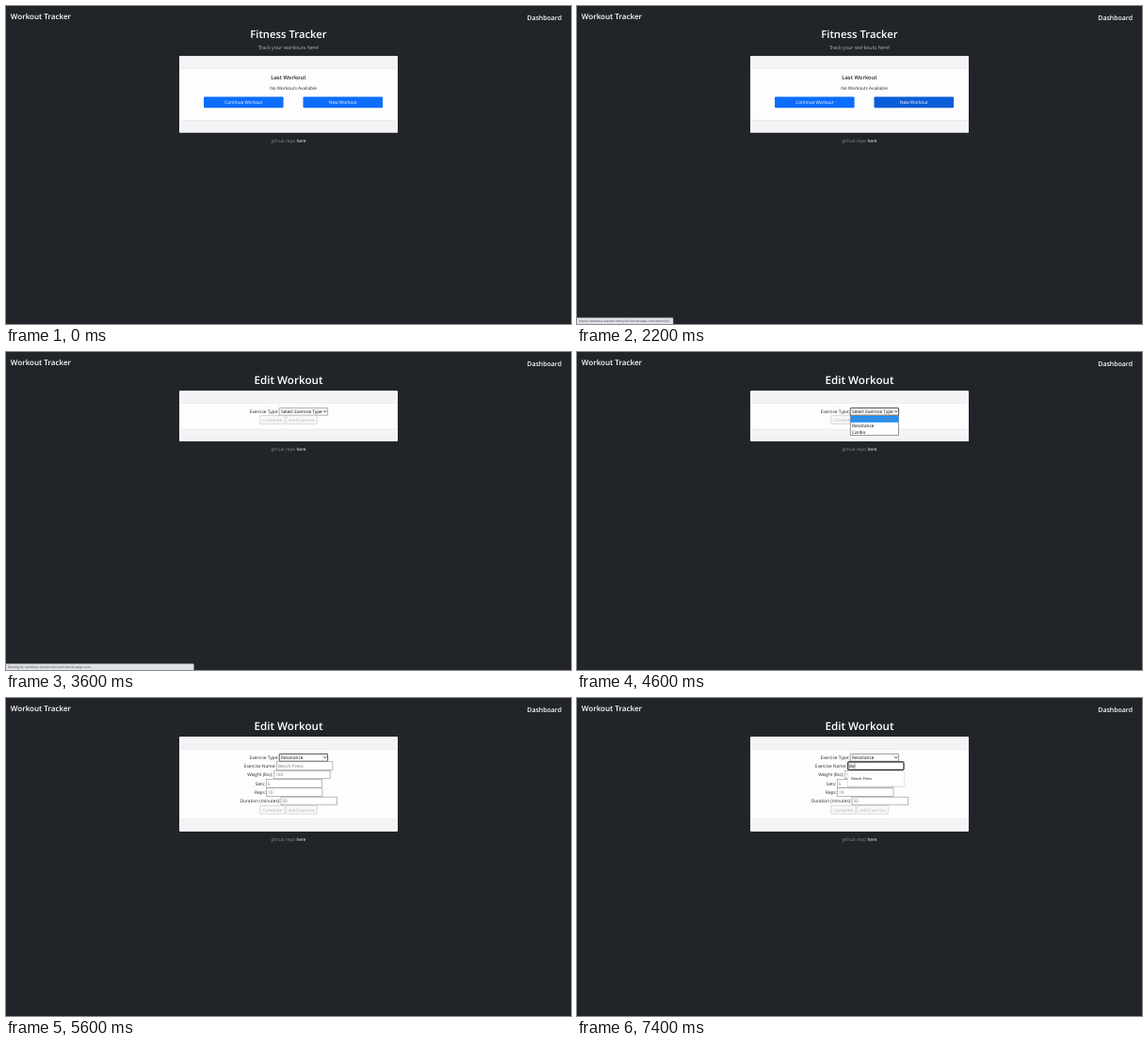
Write an HTML page that moves like this. It is 600 px wide and 338 px high and loops after 8000 ms.

```html
<!DOCTYPE html>
<html lang="en">
<head>
<meta charset="utf-8">
<title>Fitness Tracker</title>
<style>
  html, body { margin: 0; width: 100%; height: 100%; overflow: hidden; background: #212529; }
  svg { display: block; width: 100vw; height: 100vh; }
  text { font-family: "Open Sans", "Noto Sans", sans-serif; text-rendering: geometricPrecision; white-space: pre; }
</style>
</head>
<body>
<svg id="stage" viewBox="0 0 600 338" preserveAspectRatio="none"></svg>
<script>
const LOOP = 8000;
const BODY = 4.74;
const INK = '#212529';
const BLUE = { normal: '#0d6efd', hover: '#0b5ed7', active: '#0a58ca' };
const HOST = 'workout-tracker-dorryvel.herokuapp.com';
const SAVED_NAMES = ['Derry Vool', 'kbd orlane', 'Derry Callowick Vool', 'dbfoj', 'callowickvoon', 'vxcds'];

// Moments at which the picture changes, in ms
const AT = {
  hoverContinue: 1600, leaveContinue: 1800, hoverNew: 2000, linkStatus: 2200,
  press: 3000, waiting: 3200, editPage: 3600, loaded: 4000, hoverSelect: 4200,
  openSelect: 4600, pickResistance: 5200, fullForm: 5600, focusName: 6000,
  suggest: 6200, caretOff: 6600, caretOn: 7200, typed: 7400
};

const stage = document.getElementById('stage');

const rect = (x, y, w, h, fill, extra = '') =>
  `<rect x="${x}" y="${y}" width="${w}" height="${h}" fill="${fill}" ${extra}/>`;

const stroke = (color, width, radius = 0) => `stroke="${color}" stroke-width="${width}" rx="${radius}"`;

const text = (x, y, content, { size = BODY, fill = INK, weight = 400, anchor = 'start' } = {}) =>
  `<text x="${x}" y="${y}" font-size="${size}" fill="${fill}" font-weight="${weight}" text-anchor="${anchor}">${content}</text>`;

const centered = (x, y, content, style = {}) => text(x, y, content, { ...style, anchor: 'middle' });

function navbar() {
  const style = { fill: '#fff', weight: 600 };
  return text(4.8, 13.5, 'Workout Tracker', { ...style, size: 8.05 }) +
    text(590, 15.4, 'Dashboard', { ...style, size: 6.95, anchor: 'end' });
}

function card(top, bottom) {
  const height = bottom - top;
  const band = 13;
  const line = y => rect(184, y, 232, 0.4, '#d9d9dc');
  return rect(184, top, 232, height, '#fdfdfe', 'rx="1.2"') +
    rect(184, top, 232, band, '#f4f3f5', 'rx="1.2"') +
    rect(184, bottom - band, 232, band, '#f4f3f5', 'rx="1.2"') +
    line(top + band - 0.2) + line(bottom - band - 0.2);
}

function repoLink(y) {
  return centered(300, y, 'github repo <tspan fill="#fff" font-weight="500">here</tspan>', { fill: '#868a8e' });
}

function blueButton(x, label, state, focused) {
  const ring = focused ? rect(x - 1, 95.4, 86.6, 13.9, '#9dbcf0', 'rx="1.8"') : '';
  return ring + rect(x, 96.4, 84.6, 11.9, BLUE[state], 'rx="1.2"') +
    centered(x + 42.3, 104.1, label, { fill: '#fff' });
}

function homePage(t) {
  const continueState = t >= AT.hoverContinue && t < AT.leaveContinue ? 'hover' : 'normal';
  const newState = t >= AT.press ? 'active' : t >= AT.hoverNew ? 'hover' : 'normal';
  return centered(300, 33.6, 'Fitness Tracker', { size: 11.3, fill: '#fff', weight: 600 }) +
    centered(300, 46, 'Track your workouts here!', { size: 5.6, fill: '#fff', weight: 300 }) +
    card(53.3, 134.6) +
    centered(300, 77.6, 'Last Workout', { size: 5.82, weight: 600 }) +
    centered(305, 89.4, 'No Workouts Available') +
    blueButton(210, 'Continue Workout', continueState, false) +
    blueButton(315.5, 'New Workout', newState, t >= AT.waiting) +
    repoLink(145.2);
}

function select(t, label) {
  const focused = t >= AT.openSelect && t < AT.focusName;
  const border = focused ? stroke('#111', 0.7, 0.5) : stroke(t >= AT.hoverSelect ? '#444' : '#606060', 0.5, 0.3);
  return text(258.6, 65.2, 'Exercise Type:') +
    rect(290.2, 59.5, 51.4, 7.7, '#fff', border) +
    text(292, 65.2, label, { fill: '#000' }) +
    `<path d="M337.4 62.4l1.4 1.5 1.4-1.5" fill="none" stroke="#000" stroke-width=".8"/>`;
}

function field(y, labelX, label, inputX, placeholder) {
  return text(labelX, y + 1.7, label) +
    rect(inputX, y - 4.3, 59.3, 8.6, '#fff', stroke('#767676', 0.5)) +
    text(inputX + 1.3, y + 1.7, placeholder, { fill: '#757575' });
}

function formButtons(y) {
  const button = (x, w, label) =>
    rect(x, y - 4.4, w, 8.8, '#fafafa', stroke('#b4b4b4', 0.5, 0.3)) +
    centered(x + w / 2, y + 1.7, label, { fill: '#b2b2b2' });
  return button(269.7, 26.2, 'Complete') + button(297.7, 32.6, 'Add Exercise');
}

function options(t) {
  const picked = t >= AT.pickResistance ? 1 : 0;
  const labels = ['Select Exercise Type', 'Resistance', 'Cardio'];
  const rowHeight = 6.8;
  return rect(290.2, 67.6, 51.5, 21, '#fff', stroke('#555', 0.6)) +
    labels.map((label, i) => {
      const y = 68 + i * rowHeight;
      const fill = i === 0 ? '#808080' : i === picked ? '#fff' : '#000';
      return (i === picked ? rect(290.5, y, 50.9, rowHeight, '#1e90ff') : '') +
        text(292, y + 5.1, label, { fill });
    }).join('');
}

function suggestions(names) {
  const height = names.length === 1 ? 16.3 : 72;
  return rect(286.8, 77.6, 61.4, height + 0.8, '#000', 'opacity=".12" rx="1"') +
    rect(287.3, 77.5, 60.3, height, '#fff', stroke('#d4d4d6', 0.3, 0.8)) +
    names.map((name, i) => text(291.2, 86.9 + i * 11.22, name, { size: 3.85, fill: '#111' })).join('');
}

function nameInput(t) {
  const typed = t >= AT.typed;
  const caret = t < AT.caretOff || t >= AT.caretOn;
  return rect(287.8, 68, 59.2, 8.3, '#fff', stroke('#000', 1, 0.8)) +
    text(289, 73.8, typed ? 'Be' : 'Bench Press', { fill: typed ? '#000' : '#757575' }) +
    (caret ? rect(typed ? 294.8 : 288.8, 69.4, 0.4, 5.6, '#000') : '');
}

function editPage(t) {
  const heading = centered(300, 33.6, 'Edit Workout', { size: 11.65, fill: '#fff', weight: 600 });
  if (t < AT.fullForm) {
    return heading + card(41.3, 95) + select(t, 'Select Exercise Type') + formButtons(72) +
      repoLink(105.4) + (t >= AT.openSelect ? options(t) : '');
  }
  return heading + card(41.3, 141.7) + select(t, 'Resistance') +
    field(72.1, 252.8, 'Exercise Name:', 287.6, 'Bench Press') +
    field(81.5, 256.2, 'Weight (lbs):', 284.8, '100') +
    field(90.8, 264.8, 'Sets:', 276.3, '5') +
    field(100.1, 264, 'Reps:', 276.7, '10') +
    field(109.5, 248.7, 'Duration (minutes):', 292, '30') +
    formButtons(118.8) + repoLink(152.4) +
    (t >= AT.focusName ? nameInput(t) : '') +
    (t >= AT.suggest ? suggestions(t >= AT.typed ? ['Bench Press'] : SAVED_NAMES) : '');
}

function statusBar(t) {
  if (t < AT.linkStatus || t >= AT.loaded) return '';
  const waiting = t >= AT.waiting;
  const width = waiting ? 199.3 : 102;
  const label = waiting ? `Waiting for ${HOST}...` : `https://${HOST}/exercise?`;
  return rect(-1, 331.4, width + 1, 8, '#dee1e6', stroke('#b9bcc1', 0.5, 0.8)) +
    text(1.8, 336.1, label, { size: 3.56, fill: '#4b4e52' });
}

const moments = Object.values(AT);
let shown = -1;

function render(t) {
  const step = moments.filter(moment => t >= moment).length;
  if (step === shown) return;
  shown = step;
  stage.innerHTML = rect(0, 0, 600, 338, INK) + navbar() +
    (t < AT.editPage ? homePage(t) : editPage(t)) + statusBar(t);
}

const start = performance.now();
function tick() {
  render((performance.now() - start) % LOOP);
  requestAnimationFrame(tick);
}
tick();
</script>
</body>
</html>
```
